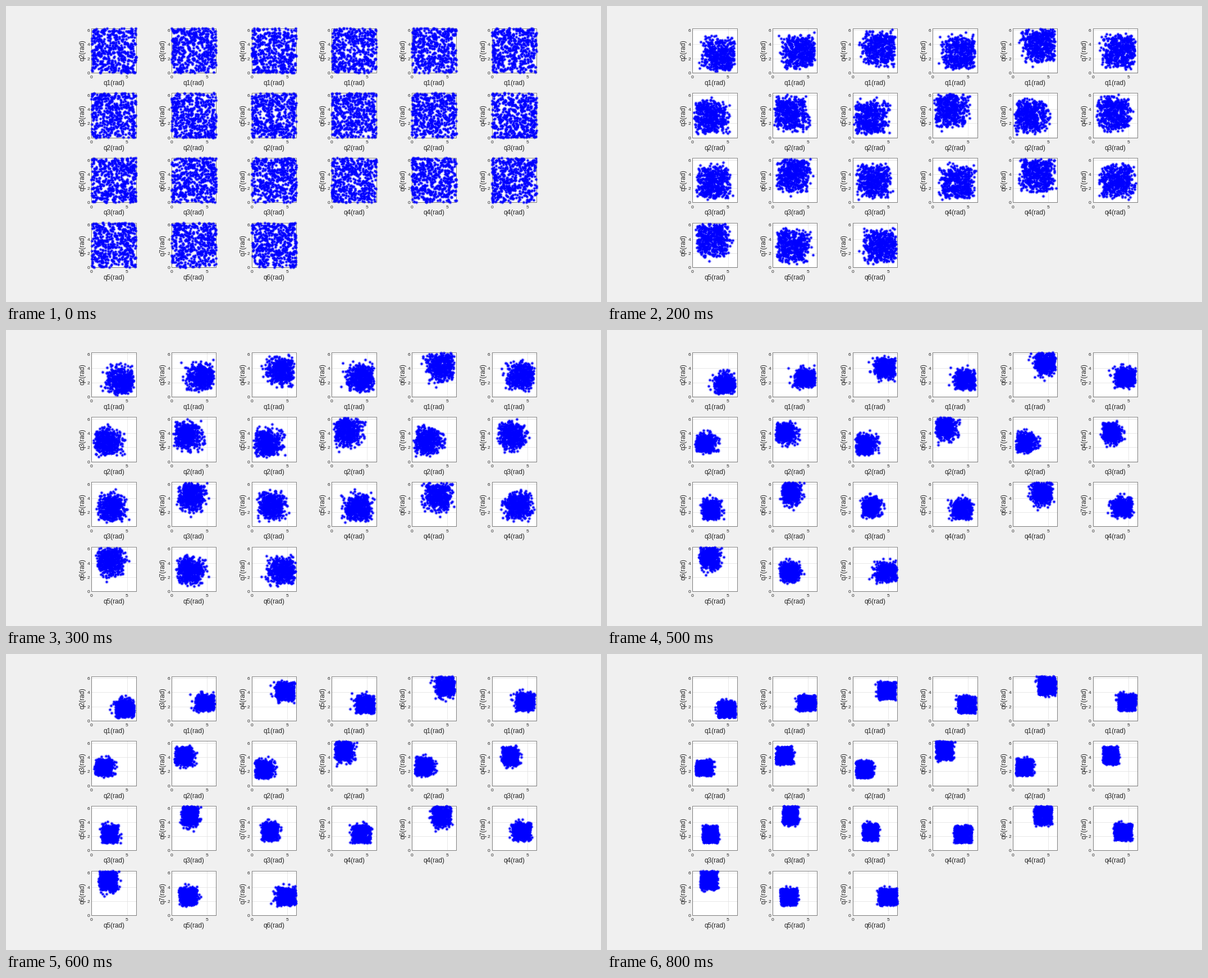
A matplotlib script that plays this animation: 1060 px wide and 528 px high, repeating every 900 ms.

```python
from itertools import combinations

import numpy as np
import matplotlib.pyplot as plt
from matplotlib.animation import FuncAnimation
from matplotlib.patches import Rectangle
from matplotlib.path import Path

W, H, DPI = 1060, 528, 100
PX = 72 / DPI                       # points per pixel
FRAMES, INTERVAL = 9, 100
COLS, COUNT = 6, 500
LEFT, TOP, SIDE = 152.4, 39.6, 79.3
STEP_X, STEP_Y = 142.65, 115.75
TURN = 2 * np.pi
SCALE = SIDE / TURN
INK = "#262626"

# Joint ranges the population settles into
LOW = np.array([3.6, 0.45, 1.4, 3.05, 1.1, 3.75, 1.4])
HIGH = np.array([6.1, 2.7, 3.55, 5.5, 3.45, 6.26, 3.75])

rng = np.random.default_rng(7)
start = rng.uniform(0, TURN, (COUNT, 7))
goal = rng.uniform(LOW, HIGH, (COUNT, 7))
rate = 0.165 * np.exp(rng.normal(0, 0.45, (COUNT, 7)))

plt.rcParams["font.family"] = "Liberation Sans"
fig = plt.figure(figsize=(W / DPI, H / DPI), dpi=DPI, facecolor="#f0f0f0")
ax = fig.add_axes([0, 0, 1, 1])
ax.set_xlim(0, W)
ax.set_ylim(H, 0)
ax.axis("off")

panels = []
for n, (i, j) in enumerate(combinations(range(7), 2)):
    row, col = divmod(n, COLS)
    panels.append((i, j, LEFT + col * STEP_X, TOP + row * STEP_Y))


def write(x, y, text, size, **kw):
    ax.text(x, y, text, fontsize=size * PX, color=INK, va="baseline", **kw)


def rule(xs, ys):
    ax.plot(xs, ys, color="#dfdfdf", lw=0.7 * PX, zorder=2)


def draw_panel(i, j, x, y):
    right, bottom = x + SIDE, y + SIDE
    ax.add_patch(Rectangle((x, y), SIDE, SIDE, fc="white", ec="none", zorder=1))
    for v in (0, 5):
        tx = x + v * SCALE
        rule([tx, tx], [y, bottom])
        write(tx, bottom + 10.2, str(v), 8.4, ha="center")
    for v in (0, 2, 4, 6):
        ty = bottom - v * SCALE
        rule([x, right], [ty, ty])
        write(x - 3, ty + 2.9, str(v), 8.4, ha="right")
    ax.add_patch(Rectangle((x, y), SIDE, SIDE, fc="none", ec=INK,
                           lw=0.55 * PX, zorder=3))
    write(x + SIDE / 2, bottom + 22, f"q{i + 1}(rad)", 11.7, ha="center")
    write(x - 12.6, y + SIDE / 2, f"q{j + 1}(rad)", 11.7, ha="center",
          rotation=90, rotation_mode="anchor")


def asterisk():
    """Four separate strokes through the centre."""
    angles = np.arange(4) * np.pi / 4
    tips = np.column_stack([np.cos(angles), np.sin(angles)])
    ends = np.stack([-tips, tips], axis=1).reshape(-1, 2)
    return Path(ends, [Path.MOVETO, Path.LINETO] * 4)


for panel in panels:
    draw_panel(*panel)

stars, = ax.plot([], [], linestyle="none", marker=asterisk(),
                 markeredgecolor="#0000ff", markerfacecolor="none",
                 markersize=6 * PX, markeredgewidth=0.8 * PX, zorder=4)


def update(k):
    lag = np.exp(-rate * k ** 1.5)
    q = goal + (start - goal) * lag
    xs = [x + q[:, i] * SCALE for i, j, x, y in panels]
    ys = [y + SIDE - q[:, j] * SCALE for i, j, x, y in panels]
    stars.set_data(np.concatenate(xs), np.concatenate(ys))
    return stars,


anim = FuncAnimation(fig, update, frames=FRAMES, interval=INTERVAL,
                     init_func=lambda: update(0), repeat=True, repeat_delay=0)
plt.show()
```
